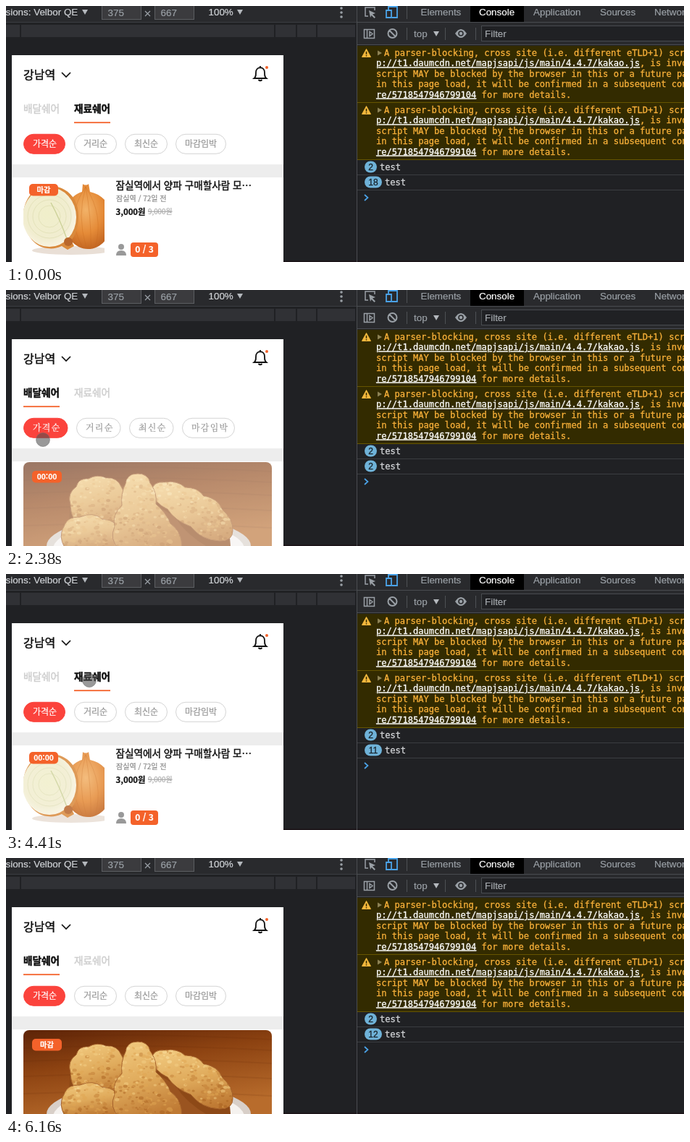
Write an HTML page that moves like this. It is 936 px wide and 354 px high and loops after 6.37 s.

```html
<!DOCTYPE html>
<html lang="ko">
<head>
<meta charset="utf-8">
<title>Share list</title>
<style>
  html, body { margin: 0; width: 100%; height: 100%; overflow: hidden; background: #202124; }
  svg { display: block; width: 936px; height: 354px; }
  text { white-space: pre; stroke-width: .2; }
  .ui { font-family: "Liberation Sans", Arial, sans-serif; font-size: 13.4px; }
  .mono { font-family: "DejaVu Sans Mono", monospace; font-size: 12.1px; }
  .mono text { stroke-width: .3; }
  .app { font-family: "Noto Sans CJK KR", "Noto Sans CJK", "Noto Sans CJK JP", sans-serif; }
  .app .medium { stroke-width: .45; }
  .loose { font-family: "Noto Serif CJK KR", "Noto Sans CJK KR", "Noto Sans CJK", serif; font-weight: 300; letter-spacing: .08em; }
  .link { fill: #fff; stroke: #fff; text-decoration: underline; }
  .line { fill: none; stroke: #9aa0a6; stroke-width: 1.5; }
</style>
</head>
<body>
<svg id="stage" viewBox="0 0 936 354"></svg>
<script>
const LOOP = 6370, TICK = 70, FADE = 500;
const ORANGE = '#f4622a', RED = '#fb433c', GRAY = '#9aa0a6', BLUE = '#4ba3e8';

const rect = (x, y, w, h, fill, extra = '') =>
  `<rect x="${x}" y="${y}" width="${w}" height="${h}" fill="${fill}" ${extra}/>`;
const text = (x, y, color, str, extra = '') =>
  `<text x="${x}" y="${y}" fill="${color}" stroke="${color}" ${extra}>${str}</text>`;
const sized = (size, weight = 400, anchor = 'start') =>
  `font-size="${size}" font-weight="${weight}" text-anchor="${anchor}"`;
const medium = size => `class="medium" font-size="${size}"`;
const path = (d, fill, extra = '') => `<path d="${d}" fill="${fill}" ${extra}/>`;
const group = (id, body, extra = '') => `<g id="${id}" ${extra}>${body}</g>`;
const down = (x, y) => path(`M${x} ${y}h8l-4 7z`, '#b4b8bd');

let seed = 7;
const random = () => (seed = (seed * 16807) % 2147483647) / 2147483647;

function deviceBar() {
  const field = (x, n) =>
    rect(x + .5, -4.5, 54, 23, '#3b3b3e', 'stroke="#5c5e62"') + text(x + 8.5, 13.5, GRAY, n);
  const ruler = [[0, 19], [21, 349], [372, 28], [402, 26], [430, 52]];
  return rect(0, 0, 484, 23, '#292a2d') + rect(0, 22, 484, 1, '#3c3e42')
    + text(-.5, 13, '#d0d3d7', 'sions: Velbor QE') + down(105, 5)
    + field(132, '375') + field(205, '667')
    + path('M192 7l7 7m0-7l-7 7', 'none', `stroke="${GRAY}" stroke-width="1.2"`)
    + text(279.5, 13, '#d0d3d7', '100%') + down(319, 5)
    + [3, 9, 15].map(y => `<circle cx="463" cy="${y}" r="1.8" fill="${GRAY}"/>`).join('')
    + ruler.map(([x, w]) => rect(x, 26, w, 17, '#303135')).join('');
}

function toolsBar() {
  const tabs = [[572.5, 'Elements'], [653, 'Console'], [728, 'Application'], [820, 'Sources'], [895, 'Network']];
  const rules = [[553, 0, 18], [553, 30, 17], [606, 30, 17], [648, 30, 17]];
  return rect(484, 0, 452, 53, '#292a2d') + rect(641, 0, 74, 22, '#000')
    + rect(485, 22, 451, 1, '#494c50') + rect(485, 53, 451, 1, '#494c50')
    + tabs.map(([x, s]) => text(x, 13, s === 'Console' ? '#fff' : GRAY, s)).join('')
    + path('M500 14h-4V2h13v4', 'none', 'class="line"') + path('M501 6l9 4-4 1.5 4 4-1.5 1.5-4-4-1.5 3z', GRAY)
    + path('M528 5V1h12v15h-7M525 6h7v10h-7z', 'none', `stroke="${BLUE}" stroke-width="1.8"`)
    + path('M494.5 32.5h14v12h-14zM498.5 32v13M502 35.5l4 3-4 3z', 'none', 'class="line"')
    + path('M539.5 38a6 6 0 1 1-12 0a6 6 0 1 1 12 0M529.3 33.8l8.4 8.4', 'none', 'class="line" style="stroke-width:2"')
    + rules.map(([x, y, h]) => rect(x, y, 1, h, '#4e5155')).join('')
    + text(563, 43, GRAY, 'top') + down(590, 35)
    + path('M620 38q8-12 16 0q-8 12-16 0z', GRAY)
    + '<circle cx="628" cy="38" r="3" fill="none" stroke="#292a2d" stroke-width="1.6"/>'
    + rect(656.5, 27.5, 290, 21, '#202124', 'stroke="#494c50"') + text(661, 43, '#a5a9ae', 'Filter');
}

function warning(y) {
  const lines = [
    [522, 'A parser-blocking, cross site (i.e. different eTLD+1) script, '],
    [511, '<tspan class="link">p://t1.daumcdn.net/mapjsapi/js/main/4.4.7/kakao.js</tspan>, is invoked'],
    [511, 'script MAY be blocked by the browser in this or a future page'],
    [511, 'in this page load, it will be confirmed in a subsequent console'],
    [511, '<tspan class="link">re/5718547946799104</tspan> for more details.']];
  return rect(485, y, 451, 78, '#332b00') + rect(485, y + 78, 451, 1, '#665500')
    + path(`M497.5 ${y + 4.5}l6 11h-12z`, '#f5b83d', 'stroke="#f5b83d" stroke-linejoin="round"')
    + rect(496.75, y + 8, 1.5, 4, '#332b00') + rect(496.75, y + 13, 1.5, 1.5, '#332b00')
    + path(`M513 ${y + 6.5}l6 3.5-6 3.5z`, '#8d8254')
    + lines.map(([x, s], i) => text(x, y + 14 + i * 14.4, '#f9b13a', s)).join('');
}

const logRow = (id, y) =>
  rect(495, y - 8.5, 17, 16, '#6fb2d8', `rx="8" id="${id}Pill"`)
  + text(503.5, y + 3.8, '#18242c', '2', `id="${id}Count" text-anchor="middle" style="font:12px 'Liberation Sans',sans-serif"`)
  + text(516, y + 4, '#d5d7da', 'test', `id="${id}Text"`)
  + rect(485, y + 10, 451, 1, '#3b3d41');

function header() {
  return text(24, 100.5, '#111', '강남역', medium(16))
    + path('M77 92l6 6 6-6', 'none', 'stroke="#111" stroke-width="1.7"')
    + path('M342.5 100h17c-2.5-2-2.5-4-2.5-8c0-9-12-9-12 0c0 4 0 6-2.5 8zM351 85v-2M348.5 102q2.5 2.5 5 0', 'none', 'stroke="#111" stroke-width="1.8"')
    + `<circle cx="360" cy="85" r="2" fill="${ORANGE}"/>`
    + text(24, 147, '', '배달쉐어', 'id="tabA" ' + medium(13.6))
    + text(94, 147, '', '재료쉐어', 'id="tabB" ' + medium(13.6))
    + rect(24, 160.3, 50, 1.8, ORANGE, 'id="underline"')
    + rect(8, 219, 375, 18, '#ededed');
}

function chips(id, xs, widths, cls) {
  const labels = ['가격순', '거리순', '최신순', '마감임박'];
  return group(id, labels.map((s, i) =>
    rect(xs[i] + .5, 177.3, widths[i], 27, i ? '#fff' : RED, `rx="13.5" stroke="${i ? '#d4d4d4' : RED}"`)
    + text(xs[i] + 13, 195.3, i ? '#969696' : '#fff', s, sized(12))).join(''), `class="${cls}"`);
}

const badge = (x, y, w) =>
  rect(x, y, w, 16.5, ORANGE, 'rx="5"')
  + text(x + w / 2, y + 12, '#fff', '마감', 'class="timer" ' + sized(10.3, 700, 'middle'));

function onions() {
  const rings = [30, 23, 15].map(r =>
    `<ellipse cx="60" cy="291" rx="${r}" ry="${r}" fill="none" stroke="#d5d6a6" opacity=".5"/>`).join('');
  const skin = [-18, -9, 2, 12].map(k =>
    path(`M110 250Q${114 + k * 1.8} 290 ${116 + k * .6} 333`, 'none', 'stroke="#c4641c" stroke-width=".8" opacity=".4"')).join('');
  return '<g clip-path="url(#thumb)">'
    + '<ellipse cx="90" cy="338" rx="54" ry="6" fill="#e9dfd6"/>'
    + path('M106 246c2 2 6 2 8 0l2 11c18 4 30 18 30 37c0 25-14 42-33 42c-18 0-32-17-32-40c0-21 10-35 24-39z', 'url(#peel)')
    + skin
    + path('M24 286c2-22 16-37 37-37c23 0 39 17 39 41c0 20-6 29-10 34l4 8-9 5-8-5c-7 3-13 4-20 3c-20-2-34-24-33-49z', '#d98a3c')
    + '<ellipse cx="60" cy="292" rx="37" ry="41" fill="url(#flesh)"/>' + rings
    + path('M62 272q12 22 22 50', 'none', 'stroke="#cdd29a" stroke-width="1.5"')
    + '<circle cx="86" cy="326" r="6" fill="#b9672c"/>'
    + '</g>';
}

function goods() {
  return group('goodsPhoto', onions()) + badge(32, 246, 40)
    + text(151.5, 253, '#111', '잠실역에서 양파 구매할사람 모…', medium(13.6))
    + text(152, 270, '#888', '잠실역 / 72일 전', sized(10))
    + text(151.5, 289, '#111', '3,000원', sized(11.4, 700))
    + text(196, 288, '#aaa', '9,000원', sized(9.8) + ' text-decoration="line-through"')
    + '<circle cx="159" cy="333" r="4" fill="#999"/>' + path('M152 345q0-7 7-7t7 7z', '#999')
    + rect(172, 327, 38, 20, ORANGE, 'rx="4"')
    + text(191, 341.3, '#fff', '0 / 3', sized(12, 700, 'middle'));
}

// A fried piece: one shaded outline filled with random crumbs.
function piece(id, d, [x, y, w, h]) {
  const tones = ['#fbe3a6', '#f4cf85', '#e0a553', '#c27f36', '#a8601f'];
  let crumbs = '';
  for (let i = 0; i < w * h / 32; i++) {
    const depth = random(), r = .8 + random() * 1.6;
    const tone = tones[Math.min(4, (random() * 3 + depth * 2.4) | 0)];
    crumbs += `<ellipse cx="${(x + random() * w).toFixed(1)}" cy="${(y + depth * h).toFixed(1)}" rx="${(r * 1.4).toFixed(1)}" ry="${r.toFixed(1)}" fill="${tone}"/>`;
  }
  return `<clipPath id="${id}">${path(d, '#000')}</clipPath>`
    + path(d, 'url(#crust)', 'stroke="#a4602a" stroke-width="1"')
    + `<g clip-path="url(#${id})" opacity=".5">${crumbs}</g>`;
}

function chicken() {
  const grain = [248, 263, 281, 302, 326].map(y =>
    path(`M24 ${y}q170 -7 343 3`, 'none', 'stroke="#592407" stroke-width="2" opacity=".12"')).join('');
  return '<g clip-path="url(#photo)">' + rect(24, 238, 343, 116, 'url(#wood)') + grain
    + '<ellipse cx="197" cy="354" rx="141" ry="42" fill="#d8cfc8"/><ellipse cx="197" cy="358" rx="132" ry="40" fill="#f5f2ef"/>'
    + path('M86 354L88 302L150 270L235 276L307 320L310 354z', '#8d4917')
    + piece('wing', 'M89 297q-5-16 8-25q3-12 17-11q12-7 24-1q16-1 21 12q9 13 3 30q2 17-16 22l-40 5q-17-10-17-32z', [84, 256, 88, 76])
    + piece('thigh', 'M201 278q2-14 18-12q18-3 28 7q18 0 26 12q20 3 25 18q16 14 15 30q0 14-18 14q-25-1-40-20q-22-8-32-24q-18-8-22-25z', [198, 264, 118, 84])
    + path('M214 302q20 10 28 24q16 18 34 28h-62z', '#9a5420')
    + piece('rib', 'M80 327q5-14 22-13q18-8 31 3q21 1 24 17l4 22H81q-9-15-1-29z', [74, 310, 90, 46])
    + piece('leg', 'M165 268q2-14 17-14q14 0 17 13q10 13 8 29q14 12 20 27q16 11 16 35h-87q-14-13-6-31q-4-16 10-29q-2-16 5-30z', [148, 252, 98, 106])
    + '</g>';
}

const grad = (id, attrs, ...stops) => {
  const kind = attrs.includes('r=') ? 'radialGradient' : 'linearGradient';
  return `<${kind} id="${id}" ${attrs}>` + stops.map(([o, c]) => `<stop offset="${o}" stop-color="${c}"/>`).join('') + `</${kind}>`;
};

document.getElementById('stage').innerHTML = '<defs>'
  + grad('wood', 'x1=".1" y1="0" x2=".5" y2="1"', [0, '#612608'], [.4, '#8c4211'], [1, '#b86c2c'])
  + grad('crust', 'x1=".3" y1="0" x2=".6" y2="1"', [0, '#f0c77c'], [.5, '#e0ab5c'], [1, '#bf7a34'])
  + grad('peel', 'cx=".45" cy=".4" r=".65"', [0, '#f2b268'], [.55, '#e58b38'], [1, '#bd601e'])
  + grad('flesh', 'cx=".45" cy=".45" r=".6"', [0, '#f0efca'], [.7, '#f1edd0'], [1, '#fbf5e6'])
  + '<clipPath id="thumb"><rect x="24" y="238" width="112" height="112" rx="6"/></clipPath>'
  + '<clipPath id="photo"><rect x="24" y="238" width="343" height="150" rx="8"/></clipPath></defs>'
  + rect(0, 0, 936, 354, '#202124')
  + `<g class="ui">${deviceBar()}${toolsBar()}</g>`
  + group('console',
      group('warnings', warning(55) + warning(134))
      + group('logs', logRow('first', 223) + logRow('second', 244))
      + path('M495 -4l4.5 4-4.5 4', 'none', `id="prompt" stroke="${BLUE}" stroke-width="1.7"`), 'class="mono"')
  + rect(383, 352, 553, 2, '#1d171b') + rect(484, 0, 1, 354, '#4b4d51')
  + rect(8, 68, 375, 286, '#fff')
  + group('page', header()
      + chips('chips', [24, 94, 164, 234], [57, 58, 58, 69], '')
      + chips('looseChips', [24, 97, 170, 243], [60.5, 60.5, 60.5, 72], 'loose')
      + group('goods', goods())
      + group('meal', group('mealPhoto', chicken()) + badge(36, 250, 41)), 'class="app"')
  + '<circle id="touch" r="9.5" fill="#505050" fill-opacity=".58" stroke="#707070" stroke-opacity=".5"/>';

const $ = id => document.getElementById(id);
const timers = document.querySelectorAll('.timer');

// [start, view, start of the photo fade]
const VIEWS = [[0, 'goods', -FADE], [1890, 'blank', 0], [2170, 'meal', 2200], [3290, 'goods', 3290],
  [3710, 'meal', 3710], [4130, 'goods', 4130], [5110, 'meal', 5110]];
const COUNTS = [[0, 18], [1680, 0], [2240, 2], [3290, 5], [3710, 8], [4130, 11], [6160, 12]];
const TOUCH = [[840, 330, 320], [910, 262, 270], [980, 195, 200], [1050, 159, 176], [1190, 159, 176],
  [1330, 163, 176], [1750, 163, 176], [2030, 110, 195], [2380, 51, 207], [2800, 56, 150], [2940, 56, 150],
  [3080, 91, 147.5], [3220, 115, 147], [3360, 115, 147], [3640, 58, 148], [3780, 58, 148], [3920, 91, 148],
  [4060, 115, 147], [4690, 115, 147], [5040, 75, 147], [5110, 60, 147], [5250, 60, 147], [5600, 373, 150]];

const at = (steps, t) => steps.findLast(s => s[0] <= t);
const show = (id, on) => $(id).style.display = on ? '' : 'none';
const set = (id, attrs) => { for (const k in attrs) $(id).setAttribute(k, attrs[k]); };

// CSS "ease": cubic-bezier(.25, .1, .25, 1)
function ease(p) {
  if (p <= 0 || p >= 1) return p <= 0 ? 0 : 1;
  const curve = (a, b, s) => 3 * a * s * (1 - s) ** 2 + 3 * b * s * s * (1 - s) + s ** 3;
  let lo = 0, hi = 1;
  for (let i = 0; i < 20; i++) {
    const mid = (lo + hi) / 2;
    if (curve(.25, .25, mid) < p) lo = mid; else hi = mid;
  }
  return curve(.1, 1, lo);
}

function drawTouch(t) {
  const i = TOUCH.findLastIndex(s => s[0] <= t), a = TOUCH[i], b = TOUCH[i + 1] || a;
  const visible = a && (a !== b || t === a[0]);
  show('touch', visible);
  if (!visible) return;
  const k = a === b ? 0 : (t - a[0]) / (b[0] - a[0]);
  set('touch', { cx: a[1] + (b[1] - a[1]) * k, cy: a[2] + (b[2] - a[2]) * k });
}

function setTab(id, active) {
  const color = active ? '#111' : '#cdcdcd';
  set(id, { fill: color, stroke: color, 'font-weight': active ? 700 : 400 });
}

function draw(t) {
  const [, view, fadeStart] = at(VIEWS, t), count = at(COUNTS, t)[1];
  const meal = view === 'meal', loose = t >= 2170 && t < 2450;
  show('page', view !== 'blank');
  show('meal', meal);
  show('goods', view === 'goods');
  show('chips', !loose);
  show('looseChips', loose);
  setTab('tabA', meal);
  setTab('tabB', !meal);
  set('underline', { x: meal ? 24 : 94 });
  $('mealPhoto').style.opacity = $('goodsPhoto').style.opacity = ease((t - fadeStart) / FADE);
  const label = t < 1890 || t >= 6160 ? '마감' : '00:00';
  timers.forEach(el => el.textContent = label);

  const warned = t < 1680 || t >= 2100, wide = count > 9;
  show('warnings', warned);
  show('logs', count);
  set('prompt', { transform: `translate(0 ${count ? 265 : warned ? 223 : 64.5})` });
  $('secondCount').textContent = count;
  set('secondPill', { width: wide ? 24 : 17 });
  set('secondCount', { x: wide ? 507 : 503.5 });
  set('secondText', { x: wide ? 523 : 516 });
  drawTouch(t);
}

const start = performance.now();
function frame() {
  const t = (performance.now() - start) % LOOP;
  draw(Math.floor(t / TICK) * TICK);
  requestAnimationFrame(frame);
}
frame();
</script>
</body>
</html>
```
